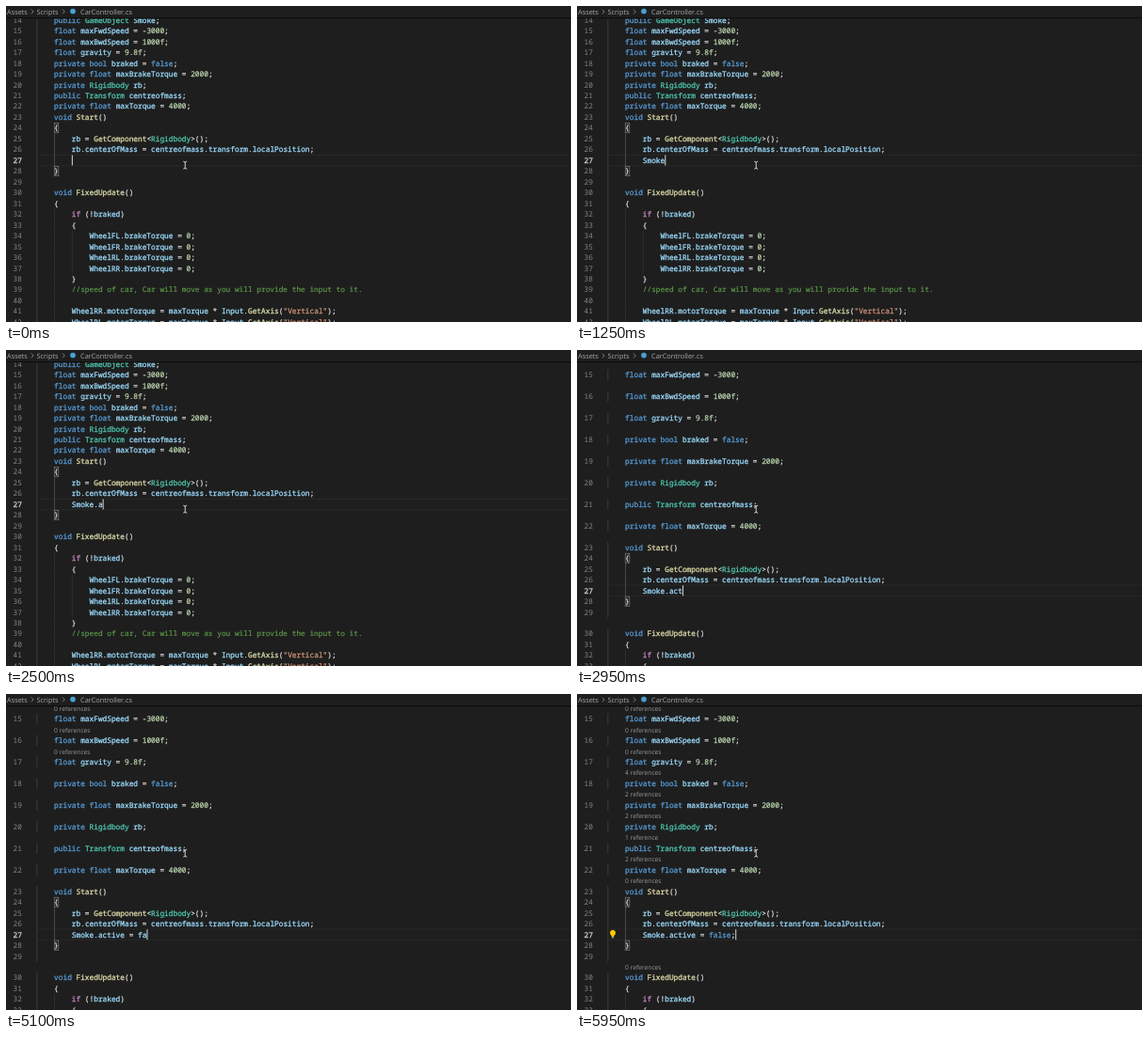
Recreate the animation shown at these times as an HTML page. Size 600 px wide and 336 px high, loop 6 s.

```html
<!DOCTYPE html>
<html lang="en">
<head>
<meta charset="utf-8">
<title>Code editor</title>
<style>
  html, body { margin: 0; width: 100%; height: 100%; overflow: hidden; background: #1e1e1e; }
  svg { display: block; width: 600px; height: 336px; }
  text { white-space: pre; text-rendering: geometricPrecision; fill: currentColor; }
  tspan { fill: currentColor; stroke: currentColor; }
  .code { font: 7.8px "Noto Sans Mono", "DejaVu Sans Mono", monospace; color: #d4d4d4; stroke-width: .28px; }
  .num { color: #858585; }
  .num.on { color: #d0d0d0; stroke: currentColor; }
  .lens { font: 6.7px "Open Sans", "Noto Sans", sans-serif; color: #999; }
  .crumb { font: 7.35px "Open Sans", "Noto Sans", sans-serif; color: #a9a9a9; }
  .keyword { color: #569cd6; }
  .control { color: #c586c0; }
  .type { color: #4ec9b0; }
  .name { color: #9cdcfe; }
  .call { color: #dcdcaa; }
  .number { color: #b5cea8; }
  .string { color: #ce9178; }
  .comment { color: #5f9e4c; stroke-width: .15px; }
</style>
</head>
<body>
<svg id="stage" viewBox="0 0 600 336">
  <rect width="600" height="336" fill="#1e1e1e"/>
  <g id="compact"></g>
  <g id="spread"></g>
  <text id="typed" class="code"></text>
  <path id="squiggle" d="M124 261.4l1-1 1 1 1-1 1 1" fill="none" stroke="#e04545" stroke-width=".8"/>
  <rect id="caret" width="1.1" height="11" fill="#c8c8c6"/>
  <g id="bulb">
    <circle cx="38" cy="254" r="2.9" fill="#ffcc00"/>
    <rect x="36.7" y="256" width="2.6" height="2" fill="#ffcc00"/>
    <rect x="36.8" y="258.4" width="2.4" height="1" fill="#c8c8c8"/>
  </g>
  <g id="header">
    <rect width="600" height="12.6" fill="#1e1e1e"/>
    <rect y="12" width="600" height="1.4" fill="#101010"/>
    <text class="crumb" x="1" y="8.8">Assets</text>
    <text class="crumb" x="32.6" y="8.8">Scripts</text>
    <text class="crumb" x="79" y="8.8">CarController.cs</text>
    <path d="M26.8 3.6l2.3 2.4-2.3 2.4M60 3.6l2.3 2.4-2.3 2.4" fill="none" stroke="#999" stroke-width=".8"/>
    <circle cx="71" cy="5.6" r="2.9" fill="#4a9fd0"/>
  </g>
  <path d="M188.3 165.3q1.7 0 1.9 1.1q.2-1.1 1.9-1.1M190.2 166v6.6M188.3 173.2q1.7 0 1.9-1.1q.2 1.1 1.9 1.1"
        fill="none" stroke="#e6e6e6" stroke-width=".9"/>
</svg>
<script>
const LOOP = 6000, LEFT = 32.4, CHAR = 4.68, ROW = 11.47, TOP = 26.4;
const FIRST = 14, ACTIVE = 27, SPREAD_AT = 2550;

const source = `
    public GameObject Smoke;
    float maxFwdSpeed = -3000;
    float maxBwdSpeed = 1000f;
    float gravity = 9.8f;
    private bool braked = false;
    private float maxBrakeTorque = 2000;
    private Rigidbody rb;
    public Transform centreofmass;
    private float maxTorque = 4000;
    void Start()
    {
        rb = GetComponent<Rigidbody>();
        rb.centerOfMass = centreofmass.transform.localPosition;
        
    }

    void FixedUpdate()
    {
        if (!braked)
        {
            WheelFL.brakeTorque = 0;
            WheelFR.brakeTorque = 0;
            WheelRL.brakeTorque = 0;
            WheelRR.brakeTorque = 0;
        }
        //speed of car, Car will move as you will provide the input to it.

        WheelRR.motorTorque = maxTorque * Input.GetAxis("Vertical");
        WheelRL.motorTorque = maxTorque * Input.GetAxis("Vertical");`.slice(1).split("\n");

const typing = "Smoke.active = false;";
const keyTimes = [400, 600, 750, 900, 1050, 1900, 2250, 2650, 2850, 3050, 3200, 3400,
                  4350, 4500, 4650, 4850, 5050, 5250, 5400, 5500, 5750];

// line, reference count, time of appearance
const lenses = [[15, 0, 4800], [16, 0, 4800], [17, 0, 4850], [18, 4, 5300], [19, 2, 5350],
                [20, 2, 5450], [21, 1, 5500], [22, 2, 5600], [23, 0, 5650], [30, 0, 5750]];

const $ = id => document.getElementById(id);
const rowY = row => TOP + ROW * row;
const colX = col => LEFT + CHAR * col;
const compactRow = n => n - 15;
const spreadRow = n => n < 23 ? (n - 15) * 2 : n < 30 ? n - 7 : n - 6;
const inStart = n => n >= 25 && n <= 27;

function add(parent, tag, attrs, text) {
  const el = document.createElementNS("http://www.w3.org/2000/svg", tag);
  for (const key in attrs) el.setAttribute(key, attrs[key]);
  if (text !== undefined) el.textContent = text;
  parent.appendChild(el);
  return el;
}

function kind(word, rest) {
  if (word.startsWith("//")) return "comment";
  if (word[0] === '"') return "string";
  if (/^\d/.test(word)) return "number";
  if (word === "if") return "control";
  if (/^(public|private|float|bool|void|false)$/.test(word)) return "keyword";
  if (/^(GameObject|Rigidbody|Transform)$/.test(word)) return "type";
  if (/^\w/.test(word)) return /^(\(|<)/.test(rest) ? "call" : "name";
  return "plain";
}

function colour(el, code) {
  el.textContent = "";
  for (const m of code.matchAll(/\/\/.*|"[^"]*"|\d[\d.]*f?|\w+|[^\w"\/]+/g))
    add(el, "tspan", { class: kind(m[0], code.slice(m.index + m[0].length)) }, m[0]);
}

function guideDepth(n) {
  if (n >= 34 && n <= 37) return 3;
  return inStart(n) || n >= 32 ? 2 : 1;
}

function guideColour(n, depth) {
  if (depth === 0) return "#404040";
  return inStart(n) ? "#505050" : "#303030";
}

function build(group, rowOf) {
  const activeY = rowY(rowOf(ACTIVE));
  for (const edge of [-1, 1])
    add(group, "rect", { x: LEFT, y: activeY + edge * ROW / 2 - .5, width: 600, height: 1, fill: "#282828" });

  source.forEach((line, i) => {
    const n = FIRST + i, y = rowY(rowOf(n));
    if (y < 10 || y > 342) return;
    for (let d = 0; d < guideDepth(n); d++)
      add(group, "rect", { x: colX(d * 4), y: y - ROW / 2, width: .9, height: ROW, fill: guideColour(n, d) });
    add(group, "text", { class: n === ACTIVE ? "code num on" : "code num", x: 7.6, y: y + 2.8 }, n);
    const code = line.trim();
    if (n === 24 || n === 28)
      add(group, "rect", { x: colX(4) + .1, y: y - 5.2, width: 4.6, height: 10.4, fill: "#222822", stroke: "#888", "stroke-width": .6 });
    if (code) colour(add(group, "text", { class: "code", x: colX(line.search(/\S/)), y: y + 2.8 }), code);
  });
}

build($("compact"), compactRow);
build($("spread"), spreadRow);
const lensTexts = lenses.map(([n, count]) =>
  add($("spread"), "text", { class: "lens", x: 51, y: rowY(spreadRow(n) - 1) + 2.7 },
      `${count} reference${count === 1 ? "" : "s"}`));

const show = (el, on) => el.setAttribute("display", on ? "inline" : "none");
let lastCount = -1;

function draw(t) {
  const spread = t >= SPREAD_AT;
  show($("compact"), !spread);
  show($("spread"), spread);
  lenses.forEach((lens, i) => show(lensTexts[i], t >= lens[2]));

  const count = keyTimes.filter(k => k <= t).length;
  const y = rowY((spread ? spreadRow : compactRow)(ACTIVE));
  const typed = $("typed"), caret = $("caret");
  if (count !== lastCount) colour(typed, typing.slice(0, count));
  lastCount = count;
  typed.setAttribute("x", colX(8));
  typed.setAttribute("y", y + 2.8);

  // the caret stays lit while typing and blinks when idle
  const idle = t - (count ? keyTimes[count - 1] : 0);
  caret.setAttribute("x", colX(8 + count));
  caret.setAttribute("y", y - 5.5);
  show(caret, Math.floor(idle / 500) % 2 === 0);

  show($("squiggle"), t >= 3900 && t < 4500);
  show($("bulb"), t >= 5900);
}

const start = performance.now();
function tick() {
  draw((performance.now() - start) % LOOP);
  requestAnimationFrame(tick);
}
tick();
</script>
</body>
</html>
```
